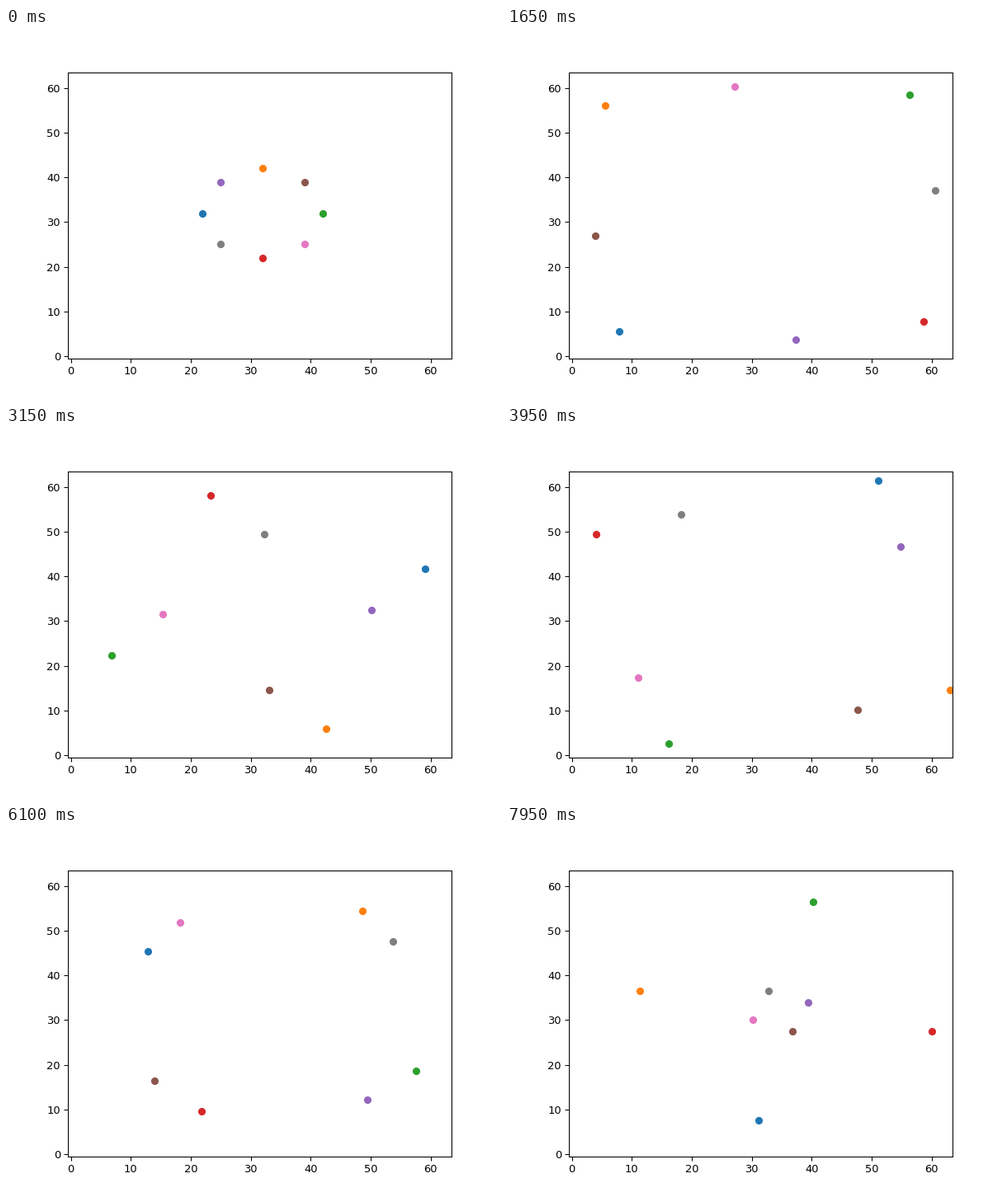
A matplotlib script for the animation above (8000 ms loop, 600 px wide and 450 px high).

```python
import numpy as np
import matplotlib.pyplot as plt
from matplotlib.animation import FuncAnimation

BOX = 64
CENTER = 32 + 32j
FRAMES = 160

# Eight particles form two rings. One path per ring, as x + yj from the
# centre with the wrapping undone; quarter turns give the other three.
TIMES = np.array([0, 20, 46, 79, 103, 140, 159])
OUTER = [10j, 22.1 + 18.4j, 53.2 + 30.1j, 93.5 + 46.5j,
         123.5 + 65.1j, 154.7 + 109.1j, 167.6 + 132.6j]
INNER = [7 + 7j, 24.1 + 0.2j, 47.8 - 10.7j, 78.7 - 21.9j,
         95.2 - 22.4j, 119.7 - 8.3j, 130 - 4.6j]


def spline(t, p, at):
    """Natural cubic spline through the points p at times t."""
    h = np.diff(t)
    slope = np.diff(p) / h
    n = len(t)
    a = np.eye(n)
    b = np.zeros(n, complex)
    for i in range(1, n - 1):
        a[i, i - 1:i + 2] = h[i - 1], 2 * (h[i - 1] + h[i]), h[i]
        b[i] = 6 * (slope[i] - slope[i - 1])
    bend = np.linalg.solve(a, b)

    k = np.clip(np.searchsorted(t, at, side="right") - 1, 0, n - 2)
    u, v, w = at - t[k], t[k + 1] - at, h[k]
    return ((bend[k] * v**3 + bend[k + 1] * u**3) / (6 * w)
            + (p[k] / w - bend[k] * w / 6) * v
            + (p[k + 1] / w - bend[k + 1] * w / 6) * u)


def smoothstep(x):
    x = np.clip(x, 0, 1)
    return x * x * (3 - 2 * x)


steps = np.arange(FRAMES)
# Each ring as a whole slowly drifts to the right.
outer_drift = 3.7 * smoothstep((steps - 20) / 130)
inner_drift = 2.8 * (steps / FRAMES) ** 1.5

tracks = []
for points, drift in ((OUTER, outer_drift), (INNER, inner_drift)):
    path = spline(TIMES, np.array(points), steps)
    for turn in (1j, 1, -1j, -1):
        tracks.append(CENTER + drift + turn * path)

fig, ax = plt.subplots(figsize=(6.4, 4.8), dpi=93.75)
ax.set_xlim(-0.5, BOX - 0.5)
ax.set_ylim(-0.5, BOX - 0.5)
ax.set_xticks(range(0, BOX, 10))
ax.set_yticks(range(0, BOX, 10))
dots = [ax.plot([], [], "o", color=f"C{i}")[0] for i in range(len(tracks))]


def draw(frame):
    for dot, track in zip(dots, tracks):
        pos = track[frame]
        dot.set_data([pos.real % BOX], [pos.imag % BOX])
    return dots


anim = FuncAnimation(fig, draw, frames=FRAMES, interval=50, repeat=True)
plt.show()
```
